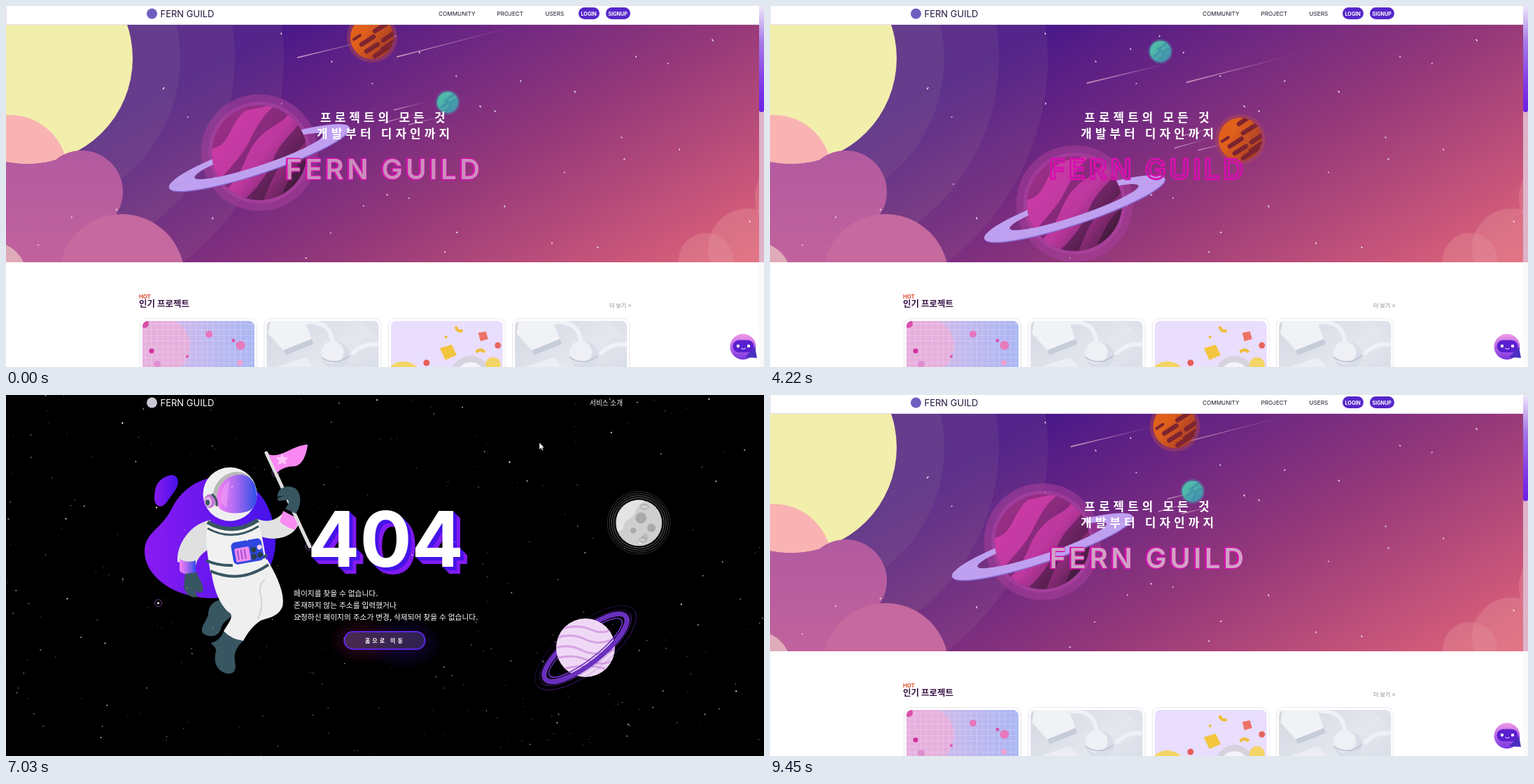
Write an HTML page that moves like this. It is 1083 px wide and 517 px high and loops after 9.65 s.

```html
<!DOCTYPE html>
<html lang="ko">
<head>
<meta charset="utf-8">
<title>Space site</title>
<style>
html, body { margin: 0; width: 100%; height: 100%; overflow: hidden; background: #fff; }
svg { display: block; width: 1083px; height: 517px; font-family: Inter, "Noto Sans CJK KR", "Noto Sans CJK", sans-serif; }
.nav { font-size: 8.2px; fill: #1d1528; }
.btn { font-size: 7.2px; font-weight: 700; fill: #fff; }
.lead { font-size: 17px; font-weight: 600; letter-spacing: 5px; fill: #fff; }
.title { font-size: 40px; font-weight: 600; letter-spacing: 4.6px; }
.brand { font-size: 13px; font-weight: 400; }
.note { font-size: 10.74px; font-weight: 500; fill: #fff; }
.big { font-size: 110px; font-weight: 700; }
</style>
</head>
<body>
<svg viewBox="0 0 1083 517">
<defs>
  <linearGradient id="sky" gradientUnits="userSpaceOnUse" x1="400" y1="28" x2="718" y2="575">
    <stop stop-color="#4a1889"/><stop offset=".5" stop-color="#93377a"/><stop offset="1" stop-color="#e3657a"/>
  </linearGradient>
  <linearGradient id="cloud" gradientUnits="userSpaceOnUse" x1="0" y1="207" x2="0" y2="367"><stop stop-color="#b35aa0"/><stop offset="1" stop-color="#c0629c"/></linearGradient>
  <linearGradient id="bar" x2="0" y2="1"><stop stop-color="#f4eefc"/><stop offset=".35" stop-color="#a77be8"/><stop offset=".7" stop-color="#8440e6"/><stop offset="1" stop-color="#6a1fe6"/></linearGradient>
  <linearGradient id="pink" x2="1" y2=".9"><stop stop-color="#a2328a"/><stop offset=".5" stop-color="#85297a"/><stop offset="1" stop-color="#35172f"/></linearGradient>
  <linearGradient id="wave" gradientUnits="userSpaceOnUse" x1="-50" y1="-40" x2="60" y2="45"><stop stop-color="#cb3ba6"/><stop offset=".5" stop-color="#bd389f"/><stop offset="1" stop-color="#8a2a78" stop-opacity=".3"/></linearGradient>
  <linearGradient id="fire" x2="1" y2=".6"><stop offset=".4" stop-color="#e0601c"/><stop offset="1" stop-color="#a83d26"/></linearGradient>
  <linearGradient id="teal" x2="1" y2="1"><stop offset=".3" stop-color="#4fbaa9"/><stop offset="1" stop-color="#4384b0"/></linearGradient>
  <linearGradient id="tail" gradientUnits="userSpaceOnUse" x1="0" x2="182"><stop stop-color="#d3a4c6" stop-opacity=".85"/><stop offset="1" stop-color="#d3a4c6" stop-opacity=".1"/></linearGradient>
  <linearGradient id="art1"><stop stop-color="#e3b6e2"/><stop offset=".5" stop-color="#c3b9ee"/><stop offset="1" stop-color="#a9b6f3"/></linearGradient>
  <linearGradient id="art2" x2="1" y2="1"><stop stop-color="#d3d7e1"/><stop offset=".5" stop-color="#e4e7ee"/><stop offset="1" stop-color="#cfd4e0"/></linearGradient>
  <linearGradient id="bot" x2="0" y2="1"><stop stop-color="#f19ae6"/><stop offset=".5" stop-color="#b766e8"/><stop offset="1" stop-color="#7a35e0"/></linearGradient>
  <linearGradient id="violet"><stop stop-color="#8a1bf2"/><stop offset="1" stop-color="#4413ea"/></linearGradient>
  <linearGradient id="visor"><stop stop-color="#f982f5"/><stop offset=".45" stop-color="#b06cf2"/><stop offset="1" stop-color="#2f4fe6"/></linearGradient>
  <linearGradient id="pill"><stop stop-color="#49294f"/><stop offset="1" stop-color="#2d2152"/></linearGradient>
  <radialGradient id="glowA"><stop stop-color="#c01c78" stop-opacity=".28"/><stop offset="1" stop-color="#c01c78" stop-opacity="0"/></radialGradient>
  <radialGradient id="glowB"><stop stop-color="#4a1ce0" stop-opacity=".3"/><stop offset="1" stop-color="#4a1ce0" stop-opacity="0"/></radialGradient>
  <pattern id="grid" width="8" height="8" patternUnits="userSpaceOnUse"><path d="M0 0H8M0 0V8" stroke="#fff" stroke-opacity=".4"/></pattern>
  <clipPath id="hero"><path d="M0 27H1076V367H0Z"/></clipPath>
  <clipPath id="sun"><circle cx="30" cy="75" r="151"/></clipPath>
  <clipPath id="body"><circle r="68"/></clipPath>
  <clipPath id="ember"><circle r="31"/></clipPath>
  <clipPath id="front"><path d="M-140 0H140V40H-140Z"/></clipPath>
  <clipPath id="ball"><circle r="42"/></clipPath>
  <clipPath id="art"><rect x="4" y="4" width="160" height="120" rx="8"/></clipPath>
  <path id="ring" fill-rule="evenodd" d="M-136 0A136 22 0 1 0 136 0A136 22 0 1 0-136 0ZM-97-2A97 13 0 1 0 97-2A97 13 0 1 0-97-2Z"/>
  <g id="orbits" fill="none" stroke="#6a30be">
    <ellipse rx="73" ry="23" stroke-width="7"/><ellipse rx="65" ry="17" stroke-width="1.5"/>
    <ellipse rx="80" ry="28" stroke-width=".7" opacity=".6"/><ellipse rx="88" ry="34" stroke-width=".6" opacity=".5"/>
  </g>
  <g id="gray">
    <path fill="url(#art2)" d="M0 0H168V130H0Z"/>
    <path fill="#f0f2f6" d="M10 0L58 2 68 30 28 46 6 22Z"/><path fill="#c7ccd9" d="M28 46L68 30 71 37 31 53Z"/>
    <path fill="none" stroke="#f0f1f6" stroke-width="6" d="M58 6Q100 2 98 42M168 38Q140 34 126 52"/>
    <circle cx="103" cy="54" r="20" fill="#d9dde7"/><circle cx="98" cy="49" r="16" fill="#eff0f5"/>
    <path fill="none" stroke="#bfc5d4" stroke-width="2" d="M82 56Q102 70 122 54"/>
    <path fill="#eceef3" d="M18 70L60 56 76 76 40 100Z"/><path fill="#dfe2eb" d="M136 4L168 0V34Z"/>
  </g>
</defs>

<g id="home">
  <path fill="#fff" d="M0 0H1083V517H0Z"/>
  <g clip-path="url(#hero)">
    <path fill="url(#sky)" d="M0 27H1076V367H0Z"/>
    <g fill="#b9a88e" fill-opacity=".09"><circle cx="30" cy="75" r="367"/><circle cx="30" cy="75" r="297"/><circle cx="30" cy="75" r="219"/></g>
    <path fill="url(#cloud)" d="M0 210H90L150 302 170 367H0Z"/>
    <circle cx="30" cy="75" r="151" fill="#f2eeac"/>
    <circle cx="5" cy="239" r="83" fill="#f9b3b3" clip-path="url(#sun)"/>
    <circle cx="108" cy="266" r="59" fill="url(#cloud)"/>
    <circle cx="165" cy="388" r="90" fill="#c5699f"/>
    <circle cx="-20" cy="388" r="50" fill="#dfabb8"/>
    <g fill="#e08f98" fill-opacity=".4"><circle cx="1130" cy="275" r="60"/><circle cx="1060" cy="347" r="57"/><circle cx="1000" cy="364" r="39"/></g>
    <path id="specks" stroke="#fff" stroke-width="1.5" stroke-linecap="round" opacity=".85"/>
    <g id="comets" fill="url(#tail)">
      <path transform="translate(416 74)" d="M0-1L120-29 0 1Z"/>
      <path transform="translate(558 73)" d="M0-1L182-47 0 1Z"/>
      <path transform="translate(554 149)" d="M0-.7L47-12 0 .7Z"/>
      <path transform="translate(575 170)" d="M0-.7L45-11 0 .7Z"/>
      <path transform="translate(541 167)" d="M0-.7L50-14 0 .7Z"/>
    </g>
    <g id="pinkPlanet">
      <circle r="83.5" fill="#a83f9c" fill-opacity=".55"/><circle r="73" fill="#b345a8" fill-opacity=".5"/>
      <use href="#ring" transform="translate(0 7) rotate(-18.5)" fill="#bfa0f0"/>
      <circle r="68" fill="url(#pink)"/>
      <g clip-path="url(#body)" fill="url(#wave)">
        <path d="M-70-5C-40-10-45-40-20-60L25-70C5-55-5-35-15-15S-45 25-62 45Z"/>
        <path d="M-50 55C-20 30-22 0 0-22S35-40 45-62L60-45C45-25 30-15 22 5S0 50-25 70Z"/>
        <path d="M5 70C15 45 25 20 40 8S65-10 70-25L72 5C50 15 42 40 30 65Z"/>
      </g>
      <g transform="translate(0 7) rotate(-18.5)" clip-path="url(#front)">
        <use href="#ring" y="1.5" fill="#8d6fd6"/><use href="#ring" fill="#bfa0f0"/>
      </g>
    </g>
    <g id="orangePlanet">
      <circle r="36" fill="#b4484f" fill-opacity=".45"/><circle r="31" fill="url(#fire)"/>
      <g clip-path="url(#ember)" stroke="#7e2430" stroke-width="6.5" stroke-linecap="round">
        <path d="M-2-22L14-33M4-9L31-26M-15 10L2-1M-8 20L8 10M16 4L31-6M4 27L26 12"/>
        <path d="M-26 3L-17-3M14 16L30 5" stroke-width="4"/>
      </g>
    </g>
    <g id="tealPlanet">
      <circle r="17.5" fill="#4a8fa8" fill-opacity=".45"/><circle r="15" fill="url(#teal)"/>
      <path d="M-9 7L1-1-3-3 8-11M-1 12L5 5 3 2 12-4" fill="none" stroke="#3d8fa6" stroke-width="3" stroke-linecap="round" opacity=".75"/>
    </g>
    <text class="lead" x="449" y="166">프로젝트의 모든 것</text>
    <text class="lead" x="444" y="189">개발부터 디자인까지</text>
    <g class="title">
      <text x="398.5" y="248" fill="none" stroke="#d411ae" stroke-width="3" stroke-linejoin="round">FERN GUILD</text>
      <text id="shine" x="399.5" y="248" fill="#d2aac8">FERN GUILD</text>
    </g>
  </g>
  <path fill="#fff" d="M0 0H1076V27H0Z"/><path stroke="#e4dfec" d="M0 26.5H1076M.5 0V27"/>
  <path fill="#dfb3c8" d="M1076 27H1083V367H1076Z"/><path fill="#fafafa" d="M1076 367H1083V517H1076Z"/>
  <rect x="1076" y="-4" width="7" height="156" rx="3.5" fill="url(#bar)"/>
  <circle cx="208.5" cy="11" r="7.5" fill="#6d5fc0"/>
  <text class="brand" x="220.5" y="15.7" fill="#23143f">FERN GUILD</text>
  <g class="nav"><text x="618" y="14">COMMUNITY</text><text x="701.5" y="14">PROJECT</text><text x="770.5" y="14">USERS</text></g>
  <g id="pills"><rect x="818" y="2" width="30" height="17" rx="8.5"/><rect x="857" y="2" width="35" height="17" rx="8.5"/></g>
  <g class="btn"><text x="821.5" y="13.5">LOGIN</text><text x="860.5" y="13.5">SIGNUP</text></g>
  <text x="190" y="419" font-size="7.8" font-weight="700" fill="#dd4a2c">HOT</text>
  <text x="190" y="431" font-size="12.5" font-weight="700" fill="#3a1748">인기 프로젝트</text>
  <text x="862" y="432" font-size="8" fill="#8b8292">더 보기 &gt;</text>
  <g id="cards"></g>
  <circle cx="1053" cy="488" r="18.5" fill="url(#bot)"/>
  <path fill="#4a2fc0" d="M1056 503L1073 504 1070 488Z"/>
  <rect x="1038.5" y="478.500" width="30" height="17.500" rx="8.700" fill="#5a1fd0"/>
  <g fill="#fff"><circle cx="1046" cy="487" r="2.2"/><circle cx="1061" cy="487" r="2.2"/></g>
  <path d="M1050.500 490Q1053.500 493 1056.500 490" fill="none" stroke="#fff"/>
</g>

<g id="lost">
  <path d="M0 0H1083V517H0Z"/>
  <g id="moon">
    <g fill="none" stroke="#999" stroke-width=".7"><circle r="36"/><circle r="39" opacity=".8"/><circle r="42" opacity=".6"/><circle r="45" opacity=".4"/></g>
    <circle r="33" fill="#cfcfcf"/><path fill="#e4e4e4" d="M-31-10A33 33 0 0 1 8-32C-8-22-2-12-14-6S-18 14-31 11Z"/>
    <g fill="#a9a9a9"><circle cx="3" cy="-7" r="8"/><circle cx="18" cy="7" r="6"/><circle cx="-8" cy="11" r="4"/><circle cx="9" cy="20" r="5" fill="#bdbdbd"/></g>
    <g fill="none" stroke="#9b9b9b"><ellipse cx="8" cy="-23" rx="6" ry="3.500"/><ellipse cx="6" cy="24" rx="5" ry="3.500"/></g>
  </g>
  <g id="saturn">
    <use href="#orbits" transform="rotate(-38)"/>
    <circle r="42" fill="#efd8f5"/>
    <path clip-path="url(#ball)" d="M-32-28Q-10-34 8-26T40-28M-42-14Q-20-22 0-12T42-14M-42 0Q-24-6-4 4T42 2M-42 15Q-18 8 4 18T42 16M-30 30Q0 22 28 30" fill="none" stroke="#d6a3e4" stroke-width="3"/>
    <g transform="rotate(-38)" clip-path="url(#front)"><use href="#orbits"/></g>
  </g>
  <g id="drift">
    <path fill="url(#violet)" d="M236 162C255 122 300 104 340 122C375 140 385 180 385 210C384 255 350 290 290 289C235 287 198 255 198 222C198 195 222 190 236 162Z"/>
    <path fill="url(#violet)" d="M213 135C215 120 230 111 240 113C250 118 246 130 238 140C230 150 226 160 218 157C210 153 212 143 213 135Z"/>
    <g fill="none" stroke="#8a52b8" stroke-width=".8"><circle cx="217.500" cy="296" r="5"/><circle cx="385" cy="110" r="5"/><circle cx="433" cy="215" r="5"/></g>
    <circle cx="217.500" cy="296" r="1.5" fill="#fff"/>
  </g>
  <g id="astro">
    <path fill="#385661" d="M322 290C305 288 290 293 289 310C287 322 277 328 281 338C290 345 303 344 307 332C309 322 318 318 324 312Z"/>
    <path fill="#385661" d="M312 333L340 348C330 357 325 366 327 378C330 392 325 397 316 396C300 392 296 378 300 364C300 356 294 356 293 352C301 350 308 345 312 333Z"/>
    <path fill="#efefef" d="M293 246Q335 262 373 232C388 258 399 282 395 300C389 316 370 317 364 320C352 328 345 338 339 349Q322 347 311 335C319 322 324 316 321 310C305 300 295 270 293 246Z"/>
    <path fill="none" stroke="#d3d3d3" stroke-width="2" d="M370 262Q360 268 364 284T360 318"/>
    <path fill="#e0e0e0" d="M292 176C262 182 243 212 245 236L271 242C274 226 286 220 296 214Z"/>
    <path fill="#e2e2e2" d="M357 174C372 180 386 178 397 164L419 178C414 200 386 208 362 199Z"/>
    <path fill="#f98bf3" d="M396 163L419 175 413 190Q398 186 391 178Z"/>
    <path fill="#f1f1f1" d="M288 178Q324 198 360 176C366 196 370 222 373 242Q335 272 292 250C287 224 284 200 288 178Z"/>
    <g fill="none" stroke="#385661">
      <path stroke-width="6" d="M288 179Q324 200 360 176"/><path stroke-width="3" d="M288 188Q324 208 361 185"/>
      <path stroke-width="4" d="M286 234Q304 242 324 241M367 230L373 226M292 249Q335 268 375 240"/>
    </g>
    <g transform="translate(345 221) rotate(-10)">
      <rect x="-22" y="-16" width="44" height="32" rx="6" fill="#3048e0"/>
      <rect x="-18" y="-7" width="21" height="20" rx="2" fill="#ef8cf1"/><path stroke="#a24fd0" stroke-width="2" d="M-14-4V10M-9-4V10M-4-4V10"/>
      <g fill="#2a3f52"><circle cx="9" cy="-1" r="4"/><circle cx="8" cy="9" r="4"/><circle cx="17" cy="8" r="4"/></g><circle cx="18" cy="-3" r="3.500" fill="#f2d5f5"/>
    </g>
    <path fill="url(#visor)" d="M248 232Q260 238 271 234L271 253Q257 257 248 249Z"/>
    <path fill="#385661" d="M256 253L272 251C276 260 281 266 282 277C277 283 272 280 269 275L274 286C265 289 256 282 254 272Z"/>
    <circle cx="320" cy="139" r="38.500" fill="#efefef"/>
    <path fill="#b9b9b9" d="M296 153C292 130 306 109 329 107Q342 107 350 116L352 122Q330 110 313 126T303 158Z"/>
    <path fill="url(#visor)" d="M301 144C303 122 318 111 336 111Q349 112 356 126Q361 145 354 158Q344 168 322 166C306 164 300 157 301 144Z"/>
    <path fill="#fcb2f8" opacity=".4" d="M307 151Q307 126 320 119L315 158Z"/>
    <ellipse cx="291" cy="149" rx="8" ry="10" fill="#bd7bd2"/><ellipse cx="289" cy="150" rx="5" ry="7" fill="#e6b5e9"/><ellipse cx="288" cy="151" rx="3" ry="4" fill="#385661"/>
    <path fill="none" stroke="#385661" stroke-width="3" d="M294 139Q303 146 301 156"/>
    <path stroke="#dedede" stroke-width="5" stroke-linecap="round" d="M372 80L434 214"/>
    <path fill="#fa87f3" d="M375 82C395 88 408 69 431 68C429 84 423 97 413 99Q397 99 387 108Z"/>
    <path fill="#fcc2f8" d="M394 80L397 86 404 87 399 91 401 97 395 94 388 97 390 91 385 86 392 86Z"/>
    <path fill="#385661" d="M388 140C389 130 402 124 414 131C423 140 422 155 414 167L399 160C403 154 406 150 402 147L390 149 387 145 397 141 388 143Z"/>
  </g>
  <g id="digits" class="big"></g>
  <g class="note">
    <text x="411" y="288">페이지를 찾을 수 없습니다.</text>
    <text x="411" y="305">존재하지 않는 주소를 입력했거나</text>
    <text x="411" y="322">요청하신 페이지의 주소가 변경, 삭제되어 찾을 수 없습니다.</text>
  </g>
  <ellipse cx="510" cy="352" rx="52" ry="34" fill="url(#glowA)"/><ellipse cx="568" cy="355" rx="58" ry="38" fill="url(#glowB)"/>
  <g id="back">
    <rect id="pillBox" x="-57.500" y="-12.500" width="115" height="25" rx="12.500" stroke-width="2.2"/>
    <text x="-28" y="3" font-size="8" font-weight="600" letter-spacing="3" fill="#fff">홈으로 이동</text>
  </g>
  <g id="stars" fill="#fff"></g>
  <circle cx="208.500" cy="11" r="7.500" fill="#c9c9d6"/>
  <text class="brand" x="220.5" y="15.7" fill="#fff">FERN GUILD</text>
  <text x="834" y="14.500" font-size="9.700" font-weight="500" fill="#fff">서비스 소개</text>
  <path id="cursor" fill="#fff" stroke="#222" stroke-width=".5" d="M0 0V10L2.300 8 4 11.500 5.500 10.800 4 7.500H7Z"/>
</g>
</svg>
<script>
const LOOP = 9650, LOST_FROM = 4620, LOST_TO = 8440;
const $ = id => document.getElementById(id);
const smooth = u => u * u * (3 - 2 * u);

// Value at time t between [time, value] points.
function track(t, points, ease = u => u) {
  let [t0, v0] = points[0];
  for (const [t1, v1] of points) {
    if (t < t1) return t <= t0 ? v0 : v0 + (v1 - v0) * ease((t - t0) / (t1 - t0));
    [t0, v0] = [t1, v1];
  }
  return v0;
}
const move = (id, x, y, more = '') => $(id).setAttribute('transform', `translate(${x} ${y}) ${more}`);

let seed = 7;
const rand = () => (seed = seed * 16807 % 2147483647) / 2147483647;

const specks = [226,117, 260,159, 393,39, 394,139, 465,79, 515,61, 556,43, 591,66, 523,111, 643,100, 677,143, 736,107,
  812,122, 900,72, 1009,48, 946,82, 879,188, 884,219, 798,238, 698,150, 712,286, 645,324, 627,352, 464,325, 428,361,
  511,286, 295,303, 262,255, 576,275, 94,302, 158,291, 46,342, 1062,308, 845,345, 962,205, 780,339, 544,270];
let d = '';
for (let i = 0; i < specks.length; i += 2) d += `M${specks[i]} ${specks[i + 1]}l${rand() * 3 - 1.5} ${rand() * 2}`;
$('specks').setAttribute('d', d);

const dot = (x, y, r, fill) => `<circle cx="${x}" cy="${y}" r="${r}" fill="${fill}"/>`;
const gray = '<use href="#gray"/>';
const bubbles = '<path fill="url(#art1)" d="M0 0H168V130H0Z"/>' + dot(32, 40, 40, '#e6b0dd') +
  '<path fill="url(#grid)" d="M0 0H168V130H0Z"/>' + dot(7, 8, 6, '#d94fa9') + dot(17, 47, 3.5, '#d32fa2') +
  dot(99, 23, 5, '#e774bd') + dot(144, 39, 6.5, '#e879bd') + dot(134, 32, 2.5, '#de52b0') +
  dot(68, 55, 2, '#de52b0') + dot(143, 64, 4, '#efa0d2') + dot(25, 66, 5, '#dd8fd0');
const toys = '<path fill="#e9defd" d="M0 0H168V130H0Z"/>' + dot(22, 90, 28, '#f4d563') + dot(118, 82, 28, '#d6d2de') +
  dot(118, 83, 20, '#f6f3fb') + dot(118, 86, 12, '#a99fb5') + dot(55, 64, 4.5, '#e85c56') + dot(157, 39, 4.5, '#e7655f') +
  '<path fill="#f3c53e" d="M74 43L91 38 98 53 82 60Z"/><path fill="#ec7266" d="M129 21L140 19 143 30 132 33Z"/>' +
  '<path fill="none" stroke="#f1bd37" stroke-width="4" d="M97 12Q98 20 107 18M126 49Q132 42 138 49"/>' +
  dot(83, 27, 2, '#f1bd37') + dot(150, 67, 11, '#f3d466') + dot(70, 82, 10, '#fff');
$('cards').innerHTML = [bubbles, gray, toys, gray].map((art, i) =>
  `<g transform="translate(${191 + i * 177.4} 447)"><rect x=".5" y=".5" width="167" height="130" rx="10" fill="#fff" stroke="#e9e6ee"/><g clip-path="url(#art)">${art}</g></g>`).join('');

// Extruded digits, far layers first.
for (let i = 10; i >= 0; i--)
  $('digits').innerHTML += `<text x="${431 + i}" y="${246 + i}" fill="${i > 5 ? '#821bf2' : i ? '#4614e8' : '#fff'}">404</text>`;

for (let i = 0; i < 330; i++)
  $('stars').innerHTML += dot(rand() * 1083, rand() * 517, .4 + rand() ** 3 * .75, '#fff');
const stars = [...$('stars').children];

function drawHome(t) {
  const mx = track(t, [[200, 0], [1300, 36.6], [LOST_TO, 36.6], [LOST_TO + 1, 22], [9450, 13.6]], smooth);
  const my = track(t, [[200, 0], [1300, 36.5], [LOST_TO, 36.5], [LOST_TO + 1, 0]], smooth);
  move('pinkPlanet', 362 + 2 * mx, 210 + 2 * my);
  move('orangePlanet', 523 + 4.07 * mx, 45 + 4 * my);
  move('tealPlanet', 631 - 2 * mx, 138 - 2 * my);
  move('comets', mx, my);
  $('shine').style.opacity = track(t, [[0, .8], [2200, 0], [LOST_TO, 0], [LOST_TO + 1, .7], [9450, .95]]);
  $('pills').style.fill = t > 1300 && t < 3400 ? '#6a35cc' : '#5627cb';
}

function drawLost(t) {
  const w = (t - 7030) / 6000 * 2 * Math.PI;
  const bob = 9.42 + 10.15 * Math.cos(w - 2.256);
  move('astro', 0, bob);
  move('drift', 0, bob * .64);
  move('saturn', 828, 366.3 + 6.77 * Math.cos(w + 2.255));
  const a = track(t, [[LOST_FROM, -80], [5820, -67], [7030, -49.3], [8240, 140], [LOST_TO, 165]]) * Math.PI / 180;
  move('moon', 831.8 + 110.7 * Math.cos(a), 266.9 + 110.7 * Math.sin(a));
  move('cursor', track(t, [[5820, 938], [7030, 762], [8040, 571]], smooth), track(t, [[5820, 187], [7030, 68], [8040, 344]], smooth));
  const hover = track(t, [[7850, 0], [8150, 1]], smooth);
  move('back', 541, 351.5, `scale(${1 + .1 * hover})`);
  $('pillBox').setAttribute('fill', hover > .5 ? '#242228' : 'url(#pill)');
  $('pillBox').setAttribute('stroke', hover > .5 ? '#8644d8' : '#5c24de');
  stars.forEach((s, i) => s.style.opacity = .7 + .3 * Math.sin(t / 400 + i * 2.4));
}

function frame(now) {
  const t = now % LOOP, lost = t >= LOST_FROM && t < LOST_TO;
  $('home').style.display = lost ? 'none' : '';
  $('lost').style.display = lost ? '' : 'none';
  (lost ? drawLost : drawHome)(t);
  requestAnimationFrame(frame);
}
frame(0);
</script>
</body>
</html>
```
